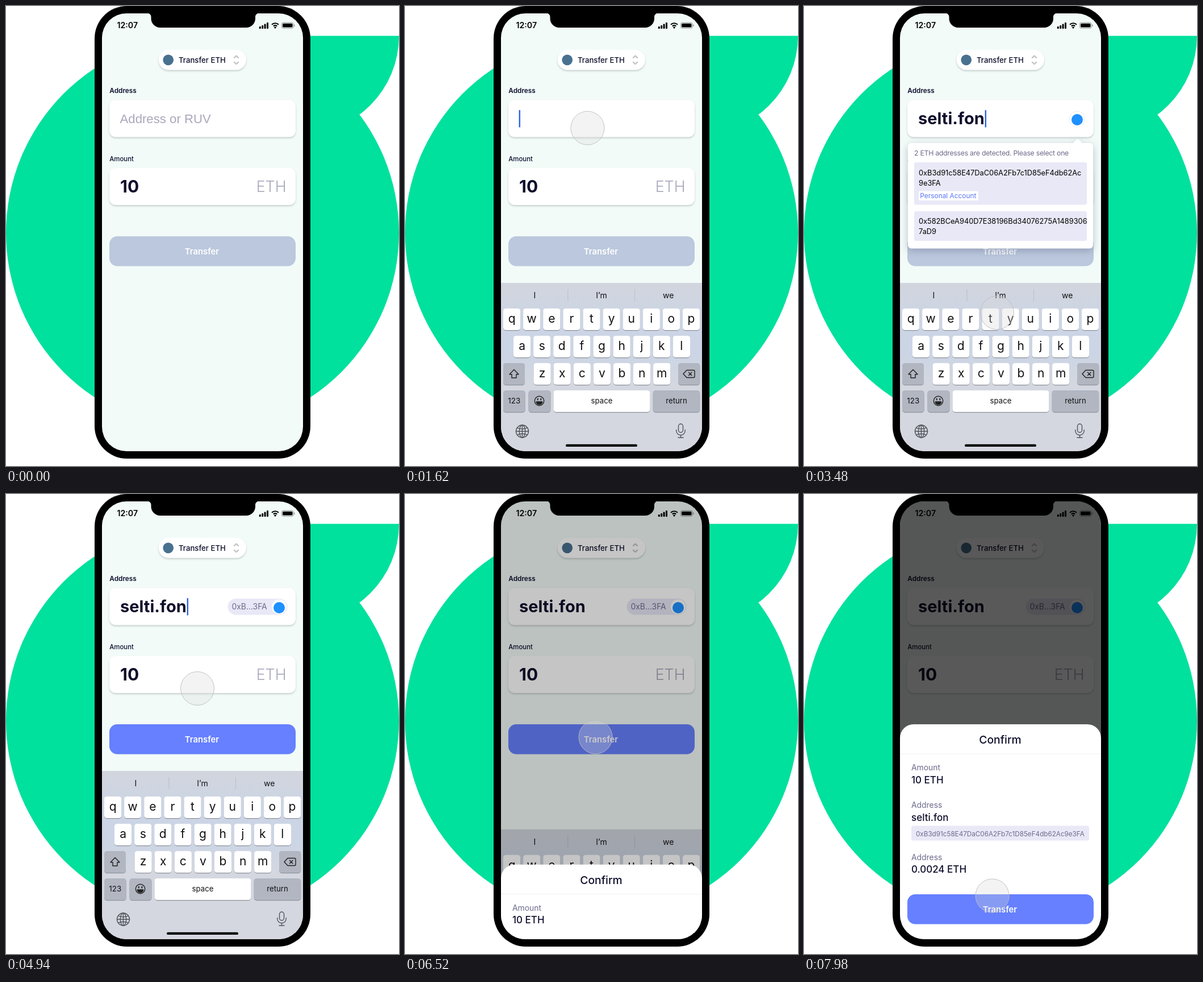
These frames come from a looping animation (692 by 809 pixels, 8000 ms). An HTML page:

```html
<!DOCTYPE html>
<html lang="en">
<head>
<meta charset="utf-8">
<title>Transfer flow</title>
<style>
  html, body { margin: 0; width: 100%; height: 100%; overflow: hidden; background: #fff; }
  svg { display: block; width: 100%; height: 100%; font-family: Inter, "Open Sans", sans-serif; }
  text { white-space: pre; }
  .card { fill: #fff; filter: drop-shadow(0 2px 1.5px rgba(20, 40, 40, .2)); }
  .pop { fill: #fff; filter: drop-shadow(0 4px 7px rgba(50, 60, 95, .3)); }
  .icon { fill: none; stroke: #222; stroke-width: 1.4; stroke-linecap: round; stroke-linejoin: round; }
</style>
</head>
<body>
<svg id="stage" viewBox="0 0 692 809"></svg>
<script>
const INK = '#0e0e2c', MUTED = '#6d6b8c', PALE = '#a9a8bc', LILAC = '#e8e8f7', BLUE = '#6680ff';
const NAME = 'selti.fon';
const ADDR_A = ['0xB3d91c58E47DaC06A2Fb7c1D85eF4db62Ac', '9e3FA'];
const ADDR_B = ['0x582BCeA940D7E38196Bd34076275A1489306', '7aD9'];

const rect = (x, y, w, h, r, fill, extra = '') =>
  `<rect x="${x}" y="${y}" width="${w}" height="${h}" rx="${r}" fill="${fill}" ${extra}/>`;
const text = (x, y, s, size, weight, fill, extra = '') =>
  `<text x="${x}" y="${y}" font-size="${size}" font-weight="${weight}" fill="${fill}" ${extra}>${s}</text>`;
const mid = 'text-anchor="middle"';
const card = (y, h) => rect(182, y, 328, h, 11, '#fff', 'class="card"');
const button = (y, fill, id = '') => rect(182, y, 328, 52.5, 14, fill, id);
const buttonLabel = y => text(345, y, 'Transfer', 14.8, 600, '#fff', mid);

function statusBar() {
  const bars = [4, 6, 8.5, 11].map((h, i) => rect(445.8 + i * 4.4, 40 - h, 3, h, 1, '#000')).join('');
  const waves = [4.5, 8.3].map(r =>
    `<path d="M${474 - r * .72} ${38.7 - r * .72}A${r} ${r} 0 0 1 ${474 + r * .72} ${38.7 - r * .72}" fill="none" stroke="#000" stroke-width="2.1"/>`).join('');
  return text(195.5, 39.3, '12:07', 14.2, 600, '#000') + bars + waves +
    '<path d="M474 40l-2.2-2.4a3 3 0 0 1 4.4 0z"/>' +
    rect(485.4, 29.2, 20.8, 10, 3, 'none', 'stroke="#000" stroke-opacity=".4"') +
    rect(487, 30.8, 17.6, 6.8, 1.6, '#000') + rect(507.2, 32.5, 1.2, 3.4, .6, '#888');
}

function form() {
  return rect(268.5, 77, 154.5, 35.5, 17.7, '#fff', 'class="card"') +
    '<circle cx="285.7" cy="94.8" r="9.4" fill="#48718f"/>' +
    text(304, 99.8, 'Transfer ETH', 13.2, 500, INK) +
    '<path d="M401.3 91.5l4.2-3.9 4.2 3.9M401.3 98.2l4.2 3.9 4.2-3.9" fill="none" stroke="#c6c6c8" stroke-width="2.4" stroke-linejoin="round"/>' +
    text(182.3, 153.4, 'Address', 11.8, 600, INK) + card(165.5, 65) +
    text(200.5, 206, 'Address or RUV', 22.2, 400, PALE, 'id="hint" font-family="Liberation Sans, Arial, sans-serif"') +
    text(201, 207.5, NAME, 29, 700, INK, 'id="ghost" opacity="0"') +
    text(201, 207.5, '', 29, 700, INK, 'id="name"') +
    rect(201, 183, 2.4, 30.5, .8, '#2f62e6', 'id="caret"') +
    `<g id="chip">${rect(390.5, 184, 105, 28.5, 14.2, LILAC)}${text(397.5, 203.3, '0xB...3FA', 13.9, 400, MUTED)}</g>` +
    '<g id="badge"><circle cx="481" cy="198.5" r="13.6" fill="#fff" stroke="#e6e6f0" stroke-width=".8"/><circle cx="481" cy="200" r="10" fill="#1e90ff"/></g>' +
    text(182.3, 272.6, 'Amount', 11.4, 500, INK) + card(285, 65) +
    text(201, 328, '10', 30, 700, INK) +
    text(493.5, 327, 'ETH', 26.8, 300, PALE, 'text-anchor="end"') +
    button(405, '#bbc8dd') + button(405, BLUE, 'id="active"') + buttonLabel(436.8);
}

function popup() {
  const lines = (y, pair) => pair.map((s, i) => text(202, y + i * 18, s, 12.8, 400, '#000')).join('');
  return '<path class="pop" d="M189 241H474L482 233.5 490 241H503a6 6 0 0 1 6 6V420.500a6 6 0 0 1-6 6H189a6 6 0 0 1-6-6V247a6 6 0 0 1 6-6z"/>' +
    text(194, 263.3, '2 ETH addresses are detected. Please select one', 12.3, 400, MUTED, 'letter-spacing="-.28"') +
    rect(194, 275, 304, 74.5, 3, LILAC) + lines(298, ADDR_A) +
    rect(202, 325.5, 105, 16.5, 2, '#fff') + text(204.3, 338.4, 'Personal Account', 11.9, 400, '#5876f6') +
    rect(194, 361, 304, 52, 3, LILAC) + lines(383, ADDR_B);
}

function keyboard() {
  const key = (x, y, w, fill = '#fff') => rect(x, y + 1.2, w, 38, 4.6, '#8f939c') + rect(x, y, w, 38, 4.6, fill);
  const gray = '#b1b6c1';
  let s = rect(169, 487, 354, 300, 0, 'url(#kb)');
  s += ['I', 'I’m', 'we'].map((w, i) => text(228.3 + i * 117.7, 513.8, w, 14, 400, '#111', mid)).join('');
  s += rect(286.5, 498, .8, 21, 0, '#b4b8c1') + rect(404, 498, .8, 21, 0, '#b4b8c1');
  [['qwertyuiop', 173], ['asdfghjkl', 191], ['zxcvbnm', 226.5]].forEach(([row, x0], r) => {
    [...row].forEach((c, i) => {
      const x = x0 + i * 35.1, y = 532 + r * 48;
      s += key(x, y, 30.2) + text(x + 15.1, y + 25, c, 21, 400, '#111', mid);
    });
  });
  s += key(173, 628, 38, gray) + key(481, 628, 38.3, gray);
  s += key(173, 676, 38.7, gray) + key(217.5, 676, 39, gray) + key(261.5, 676, 170) + key(436.7, 676, 82.5, gray);
  s += text(192.3, 699.3, '123', 13.4, 400, '#111', mid) + text(346.5, 698.8, 'space', 13.2, 400, '#111', mid) +
    text(478, 698.8, 'return', 13.2, 400, '#111', mid);
  s += '<g class="icon"><path d="M192 639.500l8 8.200h-4v6.300h-8v-6.300h-4z"/>' +
    '<path d="M490 647l6-6.500h12a2 2 0 0 1 2 2v9a2 2 0 0 1-2 2h-12zM499.500 644.300l5.400 5.400M504.900 644.300l-5.400 5.400"/>' +
    '<circle cx="236.500" cy="694.500" r="8.200"/><path d="M231.300 696h10.400a5.200 4.800 0 0 1-10.400 0z" fill="#222"/>' +
    '<path d="M233.700 690.800v1.600M239.300 690.800v1.600" stroke-width="2"/></g>';
  s += '<g class="icon" style="stroke:#4f535a"><circle cx="206.500" cy="748" r="11"/><ellipse cx="206.500" cy="748" rx="5.200" ry="11"/>' +
    '<path d="M206.500 737v22M195.500 748h22M197.800 741.800q8.700 3.800 17.400 0M197.800 754.200q8.700-3.800 17.400 0"/>' +
    '<rect x="481.500" y="735" width="8" height="15" rx="4"/><path d="M477.800 745.500v1.500a7.700 7.700 0 0 0 15.400 0v-1.500M485.500 754.800v4M481 759h9"/></g>';
  return s + rect(283, 770.7, 126, 4.4, 2.2, '#000');
}

function sheet() {
  const field = (y, label, value) => text(189, y, label, 13.9, 400, MUTED) + text(189, y + 22.5, value, 17, 500, INK);
  return '<path d="M169 800V429a24 24 0 0 1 24-24H499a24 24 0 0 1 24 24V800z" fill="#fff"/>' +
    text(345.5, 439, 'Confirm', 19.3, 500, INK, mid) + rect(169, 456.5, 354, 1, 0, '#f1f1f3') +
    field(486, 'Amount', '10 ETH') + field(552, 'Address', NAME) +
    rect(189, 583.5, 313, 26, 4, LILAC) + text(197, 601.6, ADDR_A.join(''), 11.7, 400, MUTED) +
    field(643.5, 'Address', '0.0024 ETH') + button(704, BLUE) + buttonLabel(735.8);
}

const stage = document.getElementById('stage');
stage.innerHTML = `
  <defs>
    <clipPath id="screen"><rect x="169" y="13" width="354" height="770" rx="43"/></clipPath>
    <linearGradient id="kb" x1="0" y1="0" x2="0" y2="1">
      <stop offset="0" stop-color="#d2d5dd"/><stop offset=".25" stop-color="#cbd5e6"/>
      <stop offset=".42" stop-color="#ccd5e5"/><stop offset=".6" stop-color="#d4d7df"/><stop offset="1" stop-color="#d4d7df"/>
    </linearGradient>
  </defs>
  <g fill="#00e19d"><circle cx="346" cy="399" r="346"/><path d="M346 52.500H692A173 173 0 0 1 346 52.500z"/></g>
  ${rect(156, 0, 380, 796, 57, '#000')}
  <g clip-path="url(#screen)">
    ${rect(169, 13, 354, 770, 0, '#f2fbf8')}
    ${statusBar()}${form()}
    <g id="pop">${popup()}</g>
    <g id="keys">${keyboard()}</g>
    ${rect(169, 13, 354, 770, 0, '#000', 'id="shade"')}
    <g id="sheet">${sheet()}</g>
  </g>
  <path d="M249 12.500a6.500 6.500 0 0 1 6.500 6.500v3a16 16 0 0 0 16 16H423a16 16 0 0 0 16-16v-3a6.500 6.500 0 0 1 6.500-6.500z"/>
  <circle id="touch" r="29.500" fill="#d8d8d8" stroke="#bdbdbd" stroke-width=".9"/>`;

const el = {};
stage.querySelectorAll('[id]').forEach(n => el[n.id] = n);

const ramp = (t, a, b) => Math.min(1, Math.max(0, (t - a) / (b - a)));
const smooth = p => p * p * (3 - 2 * p);
const easeOut = p => 1 - (1 - p) ** 2;
const show = (node, v) => node.setAttribute('opacity', v);
const shift = (node, y) => node.setAttribute('transform', `translate(0 ${y})`);

// Finger path: start, end, from, bend point, to
const moves = [
  [350, 720, [592, -32], [440, 110], [321, 211], easeOut],
  [1560, 2540, [321, 211], [341, 375], [340, 539.5], smooth],
  [3940, 4340, [340, 539.5], [337, 440], [337, 342], smooth],
  [5560, 6220, [337, 342], [336.5, 385], [335.5, 427.5], smooth],
  [7260, 7970, [335.5, 427.5], [335, 565], [331.5, 706.5], smooth]
];
const taps = [[1060, 1200], [2620, 2760], [4480, 4640], [6240, 6380]];

function finger(t) {
  const [a, b, p, q, r, ease] = moves.filter(m => t >= m[0]).pop() || moves[0];
  const s = ease(ramp(t, a, b)), u = 1 - s;
  return [0, 1].map(i => u * u * p[i] + 2 * u * s * q[i] + s * s * r[i]);
}

function draw(t) {
  const open = ramp(t, 1186, 1386), found = ramp(t, 3140, 3480);
  const chosen = ramp(t, 4630, 4930), confirm = ramp(t, 6382, 6782);
  const typed = t < 2760 ? 0 : Math.min(NAME.length, 1 + Math.floor((t - 2760) / 42));

  show(el.hint, 1 - open);
  if (el.name.textContent.length !== typed) el.name.textContent = NAME.slice(0, typed);
  const part = typed ? el.ghost.getSubStringLength(0, typed) / el.ghost.getComputedTextLength() : 0;
  el.caret.setAttribute('x', 200.6 + 118 * part);
  show(el.caret, t >= 1200 && t < 6380 ? 1 : 0);

  show(el.badge, found);
  show(el.chip, chosen);
  show(el.active, chosen);
  show(el.pop, found * (1 - chosen));
  shift(el.pop, -24 * (1 - found + chosen));

  shift(el.keys, 296 * (1 - open + confirm));
  show(el.shade, .65 * confirm);
  shift(el.sheet, 378 * (1 - confirm));

  const [x, y] = finger(t);
  el.touch.setAttribute('cx', x);
  el.touch.setAttribute('cy', y);
  el.touch.setAttribute('fill-opacity', taps.some(([a, b]) => t >= a && t < b) ? .6 : .3);
  show(el.touch, t >= 350 ? 1 : 0);
}

const start = performance.now();
function tick() {
  draw((performance.now() - start) % 8000);
  requestAnimationFrame(tick);
}
draw(0);
requestAnimationFrame(tick);
</script>
</body>
</html>
```
